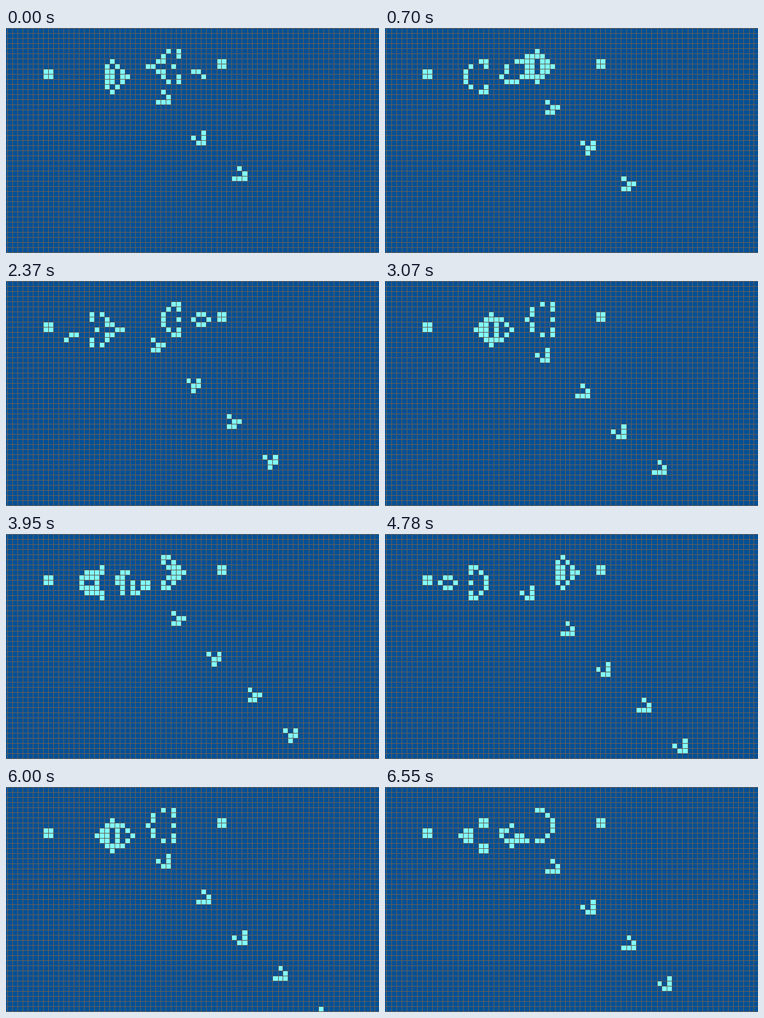
These frames come from a looping animation (584x353 px, 6.65 s). A matplotlib script:

```python
import numpy as np
import matplotlib.pyplot as plt
from matplotlib.animation import FuncAnimation

W, H, DPI = 584, 353, 100
LOOP, STEP = 6650, 25     # ms
PITCH = 8                 # distance between grid lines
GEN_MS = 96.5             # time per generation
REFRESHES = 48            # picture changes per loop

BACK = (0, 80, 150)
LINE = (102, 94, 88)
LIVE = (128, 255, 255)

BLOCK = ["XX",
         "XX"]
QUEEN_BEE = ["XX..",
             "..X.",
             "...X",
             "...X",
             "...X",
             "..X.",
             "XX.."]

# The refresh rate drifts a little: (refresh number, time in ms)
PACE = [(0, 0), (11, 1520), (22, 3070), (28, 3950),
        (34, 4780), (39, 5450), (47, 6550)]


def stamp(grid, shape, col, row):
    for dy, line in enumerate(shape):
        for dx, mark in enumerate(line):
            grid[row + dy, col + dx] = mark == "X"


def evolve(grid, steps=1):
    for _ in range(steps):
        near = sum(np.roll(grid, (dy, dx), (0, 1))
                   for dy in (-1, 0, 1) for dx in (-1, 0, 1)) - grid
        grid = ((near == 3) | ((grid == 1) & (near == 2))).astype(int)
    return grid


def glider_gun():
    """Two shuttles, ten generations apart, run until three gliders are out."""
    grid = np.zeros((64, 90), dtype=int)
    stamp(grid, BLOCK, 7, 8)
    stamp(grid, BLOCK, 41, 6)
    stamp(grid, QUEEN_BEE, 29, 4)
    grid = evolve(grid, 10)
    stamp(grid, QUEEN_BEE, 15, 6)
    return evolve(grid, 102)


starts = np.interp(np.arange(REFRESHES), *zip(*PACE))
shown = np.round(starts / GEN_MS).astype(int)

history = [glider_gun()]
while len(history) <= shown[-1]:
    history.append(evolve(history[-1]))

# In the right half most vertical lines sit one pixel further left
k = np.arange(W // PITCH)
line_x = PITCH * k + 2 - ((k >= 36) & (k % 6 != 5))
line_y = np.arange(0, H, PITCH)
cells = np.ix_(np.searchsorted(line_y, np.arange(H), side="right") - 1,
               np.searchsorted(line_x, np.arange(W), side="right") - 1)


def paint(grid):
    picture = np.empty((H, W, 3), dtype=np.uint8)
    picture[:] = BACK
    picture[grid[cells] == 1] = LIVE
    picture[line_y] = LINE
    picture[:, line_x] = LINE
    return picture


fig = plt.figure(figsize=(W / DPI, H / DPI), dpi=DPI)
image = fig.figimage(paint(history[0]), origin="upper")


def update(i):
    now = (i + 1) * STEP - 1
    refresh = np.searchsorted(starts, now, side="right") - 1
    image.set_data(paint(history[shown[refresh]]))
    return [image]


anim = FuncAnimation(fig, update, frames=LOOP // STEP, interval=STEP,
                     repeat=True, repeat_delay=0)
plt.show()
```
